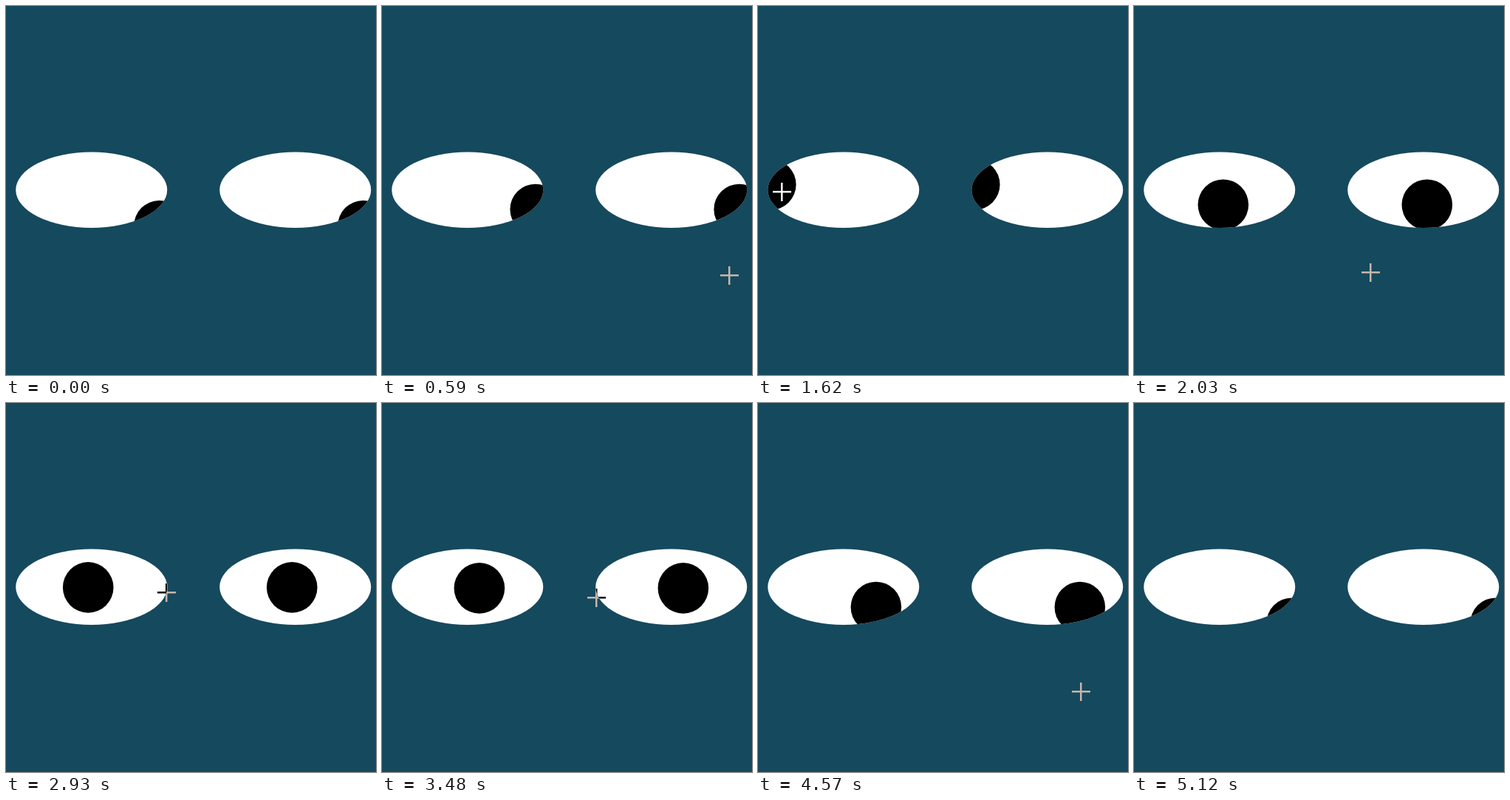
An HTML page with a canvas for the animation above (5400 ms loop, 501 px wide and 499 px high).

```html
<!DOCTYPE html>
<html lang="en">
<head>
<meta charset="utf-8">
<title>Eyes</title>
<style>
  html, body { margin: 0; width: 100%; height: 100%; overflow: hidden; background: #15495d; }
  canvas { display: block; }
</style>
</head>
<body>
<canvas id="stage" width="501" height="499"></canvas>
<script>
const ctx = document.getElementById('stage').getContext('2d');
const LOOP = 5400, LAST_STEP = 75;
const BG = '#15495d', LIGHT = '#c6b6ad';
const EYES = [115.75, 391.75], EYE_Y = 248.75, RX = 102.5, RY = 51.25, PUPIL = 34.3;

// Turning points of the pointer: step, x, y
const PATH = [
  [-1, 475, 490], [2, 487, 424], [9, 470, 364], [12, 425, 230],
  [16, 283.6, 95.6], [17, 237, 71], [22, 10, 185], [26, 105, 315],
  [29, 263, 350], [30, 320.5, 360.5], [35, 491, 318], [42, 239.6, 254.9],
  [43, 217.5, 256.5], [46, 190, 261], [50, 290, 259.8], [51, 290, 263.5],
  [60, 121, 313.7], [61, 106, 320], [64, 205, 370], [68, 489, 396],
  [73, 491, 421], [74, 490, 492]
];

// The picture advances in steps that slow down a little after the first turn
function stepAt(t) {
  const s = t < 1130 ? t / 66.5 : 17 + (t - 1130) / 68.8;
  return Math.min(LAST_STEP, Math.floor(s + 0.12));
}

function slope(i, axis) {
  const a = PATH[Math.max(i - 1, 0)], b = PATH[Math.min(i + 1, PATH.length - 1)];
  return (b[axis] - a[axis]) / (b[0] - a[0]);
}

// Smooth curve through the turning points
function pointer(step) {
  let i = 0;
  while (i < PATH.length - 2 && PATH[i + 1][0] <= step) i++;
  const a = PATH[i], b = PATH[i + 1], d = b[0] - a[0];
  const u = Math.min(1, (step - a[0]) / d), v = 1 - u;
  return [1, 2].map(axis =>
    v * v * (1 + 2 * u) * a[axis] + u * u * (3 - 2 * u) * b[axis] +
    u * v * d * (v * slope(i, axis) - u * slope(i + 1, axis)));
}

function oval(x, y, rx, ry) {
  const p = new Path2D();
  p.ellipse(x, y, rx, ry, 0, 0, 2 * Math.PI);
  return p;
}

function cross([x, y], color) {
  const left = Math.round(x - 12.5), top = Math.round(y - 12.5);
  ctx.fillStyle = color;
  ctx.fillRect(left, top + 11, 25, 2.5);
  ctx.fillRect(left + 11, top, 2.5, 25);
}

function draw(step) {
  // The pupils follow one step behind the pointer
  const tip = pointer(step), [gx, gy] = pointer(step - 1);
  const shown = tip[1] < 430;
  ctx.fillStyle = BG;
  ctx.fillRect(0, 0, 501, 499);
  if (shown) cross(tip, LIGHT);
  for (const cx of EYES) {
    const white = oval(cx, EYE_Y, RX, RY);
    const pupil = oval(cx - RX + 0.409 * gx, 197.4 + 0.204 * gy, PUPIL, PUPIL);
    ctx.fillStyle = '#fff';
    ctx.fill(white);
    ctx.save();
    ctx.clip(white);
    // The pointer inverts against whatever lies below it
    if (shown) cross(tip, '#000');
    ctx.fillStyle = '#000';
    ctx.fill(pupil);
    if (shown) {
      ctx.clip(pupil);
      cross(tip, '#fff');
    }
    ctx.restore();
  }
}

const begin = performance.now();
function frame() {
  draw(stepAt((performance.now() - begin) % LOOP));
  requestAnimationFrame(frame);
}
frame();
</script>
</body>
</html>
```
